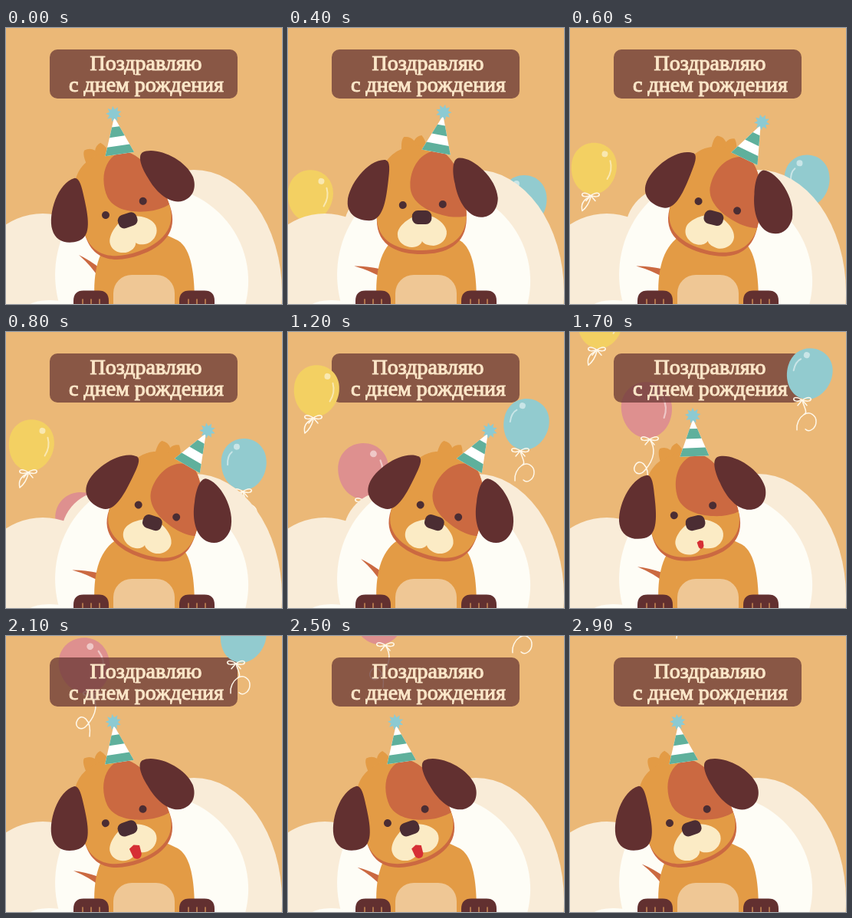
Recreate the animation shown at these times as an HTML page. Size 360x360 px, loop 3000 ms.

```html
<!DOCTYPE html>
<html lang="ru">
<head>
<meta charset="utf-8">
<title>Поздравляю с днем рождения</title>
<style>
  html, body { margin: 0; width: 100%; height: 100%; overflow: hidden; background: #ebb877; }
  svg { display: block; width: 100vw; height: 100vh; }
  text { font: 28px "Liberation Serif", "Times New Roman", serif; fill: #fbe6c8; stroke: #fbe6c8; stroke-width: 1.1; text-anchor: middle; }
  .line { fill: none; stroke: #fff8ea; stroke-width: 1.5; stroke-linecap: round; stroke-linejoin: round; }
  .shine { fill: none; stroke: #fff; stroke-opacity: .5; stroke-width: 2; stroke-linecap: round; }
  .dot { fill: #fff; fill-opacity: .5; }
  .cream { fill: #f9ecd8; }
  .white { fill: #fefdf6; }
  .fur { fill: #e39b45; }
  .rust { fill: #cb6941; }
  .ear { fill: #623030; }
  .dark { fill: #4b2d33; }
  .teal { fill: #5fb09c; }
  .claw { fill: none; stroke: #c98a55; stroke-width: 1.5; stroke-linecap: round; }
</style>
</head>
<body>
<svg viewBox="0 0 360 360">
  <defs>
    <path id="skull" d="M178 153C212 153 233 195 233 243C233 279 205 290 175 290C145 290 116 280 116 245C114 180 130 153 178 153Z"/>
    <clipPath id="face"><use href="#skull"/></clipPath>
    <path id="skin" d="M0 0C-18 0 -29.5 -18 -29.5 -36C-29.5 -55 -16 -67 0 -67C16 -67 29.5 -55 29.5 -36C29.5 -18 18 0 0 0Z"/>
    <path id="bow" class="line" d="M0 2C-14 -8 -16 8 0 2C14 -8 16 8 0 2L-6 9M0 2L6 9"/>
    <g id="shineRight">
      <circle class="dot" cx="12" cy="-54" r="4"/>
      <path class="shine" d="M20 -46Q25 -34 19 -22"/>
    </g>
    <g id="paw">
      <path class="ear" d="M-23 362V356Q-23 342.500 -10 342.500H10Q23 342.500 23 356V362Z"/>
      <path class="claw" d="M-11 354V361M0 354V361M11 354V361"/>
    </g>
  </defs>

  <rect width="360" height="360" fill="#ebb877"/>

  <g id="pink">
    <g class="body">
      <g transform="scale(1.12 1.09)"><use href="#skin" fill="#de908f"/><use href="#shineRight"/></g>
    </g>
    <path class="line" d="M0 2C8 14 6 28 -6 42C-14 52 -24 44 -19 36C-14 26 0 34 -3 57"/>
    <use href="#bow"/>
  </g>

  <rect x="57" y="28" width="245" height="64" rx="10" fill="#683735" fill-opacity=".75"/>
  <text x="182.500" y="55">Поздравляю</text>
  <text x="183" y="83">с днем рождения</text>

  <g id="yellow">
    <g class="body"><use href="#skin" fill="#f3d062"/><use href="#shineRight"/></g>
    <path class="line" d="M-2 4C-10 8 -13 14 -11 22C-6 18 -2 12 0 4"/>
    <use href="#bow"/>
  </g>
  <g id="blue">
    <g class="body">
      <use href="#skin" fill="#92cbcf"/>
      <circle class="dot" cx="-10" cy="-56" r="4"/>
      <path class="shine" d="M-21 -32Q-22 -44 -16 -49"/>
    </g>
    <path class="line" d="M0 2C2 12 8 18 2 21C-4 25 -8 33 -7 41M2 21C10 16 18 22 18 30C18 39 9 45 4 40"/>
    <use href="#bow"/>
  </g>

  <ellipse class="cream" cx="245" cy="345" rx="115" ry="160"/>
  <circle class="cream" cx="130" cy="265" r="58"/>
  <circle class="cream" cx="48" cy="330" r="88"/>
  <path class="white" d="M190 190V206A126 124 0 0 1 302 387L70 362A126 132 0 0 1 190 190Z"/>
  <ellipse class="white" cx="57" cy="364" rx="28" ry="9"/>

  <path id="tail" class="rust" d="M95 296Q108 302 125 315L121 326Q112 311 95 296Z"/>
  <path class="fur" d="M150 268C122 280 112 315 116 362H246C246 325 243 288 224 277L205 268Z"/>
  <rect x="140" y="322" width="80" height="60" rx="24" fill="#efc795"/>
  <use href="#paw" x="111"/>
  <use href="#paw" x="249"/>

  <g id="head">
    <use href="#skull" class="rust" y="5"/>
    <path class="fur" d="M149 164Q147 146 152 142Q160 141 165 147Q168 141 175 140Q181 147 183 162Z"/>
    <use href="#skull" class="fur"/>
    <path class="rust" clip-path="url(#face)" d="M192 160C168 164 158 190 160 210C163 231 188 242 210 246C225 248 240 246 240 240V160Z"/>
    <g transform="translate(203 114) rotate(11)">
      <path fill="#fff" d="M0 0L19 49H-19Z"/>
      <path class="teal" d="M-5 13H5L10 26H-10ZM-14.700 38H14.700L19 49H-19Z"/>
      <path id="star" fill="#8ccad2"/>
    </g>
    <path class="ear" d="M128 172C134 174 133 185 131 200C128 225 124 251 106 251C90 251 77 242 78 226C79 205 105 170 128 172Z"/>
    <path class="ear" d="M222 170C214 173 215 190 218 203C222 227 235 247 252 247C266 247 274 236 274 222C272 195 240 167 222 170Z"/>
    <circle class="dark" cx="150" cy="231" r="5"/>
    <circle class="dark" cx="202" cy="230" r="5"/>
    <path fill="#fbebc5" d="M175 243C165 243 143 256 143 269C143 280 153 286 162 286C169 286 174 282 175 278C177 282 184 284 190 284C200 283 208 275 207 265C205 253 188 243 175 243Z"/>
    <path id="tongue" fill="#d62f35" d="M-7 2L0 -1L7 2L6 13Q4 18 0 18Q-5 18 -6 13Z"/>
    <rect class="dark" x="162" y="238" width="25.500" height="18" rx="7.500"/>
  </g>
</svg>
<script>
  const $ = id => document.getElementById(id);
  const LOOP = 3000, STEP = 100;
  const linear = p => p;
  const sine = p => (1 - Math.cos(Math.PI * p)) / 2;

  // Value at time t on a track of [time, value] points
  function at(track, t, ease = linear) {
    if (t <= track[0][0]) return track[0][1];
    for (let i = 1; i < track.length; i++) {
      const [t0, a] = track[i - 1], [t1, b] = track[i];
      if (t <= t1) return a + (b - a) * ease((t - t0) / (t1 - t0));
    }
    return track[track.length - 1][1];
  }

  const headTurn = [[50, -19.4], [750, 19], [1200, 19], [1880, -19.6], [2900, -19.4]];
  const tailTurn = [[0, 0], [350, -26], [850, -26], [1200, 0], [1700, -19], [2100, -19], [2900, -3], [3000, 0]];
  const tongueOut = [[1450, 0], [1900, 1], [2450, 1], [2800, 0]];

  // Each balloon hangs on its knot: start height, rise speed, sideways drift, tilt
  const balloons = [
    { id: 'yellow', y: 323, v: .1775, x: [[400, 25], [1200, 33], [1700, 35]], tilt: [[0, 7]] },
    { id: 'blue', y: 312, v: .1325, x: [[400, 308], [800, 309], [1200, 303], [1700, 303], [2100, 300]],
      tilt: [[400, 0], [800, 2], [1200, 13], [1700, 16]] },
    { id: 'pink', y: 410, v: .16, x: [[800, 98], [1200, 99], [1700, 104], [2100, 112], [2900, 142]],
      tilt: [[1200, -1], [1700, -6], [2100, -15]] }
  ];

  const points = Array.from({ length: 18 }, (_, i) => {
    const a = i * Math.PI / 9, r = i % 2 ? 6 : 10.5;
    return `${(r * Math.sin(a)).toFixed(2)} ${(-4 - r * Math.cos(a)).toFixed(2)}`;
  });
  $('star').setAttribute('d', `M${points.join('L')}Z`);

  const move = (el, value) => el.setAttribute('transform', value);

  function draw(t) {
    move($('head'), `rotate(${at(headTurn, t, sine)} 178 296)`);
    move($('tail'), `rotate(${at(tailTurn, t, sine)} 122 322)`);
    move($('tongue'), `translate(175 271) scale(${at(tongueOut, t, sine)})`);
    for (const b of balloons) {
      const el = $(b.id);
      move(el, `translate(${at(b.x, t)} ${b.y - b.v * t})`);
      move(el.querySelector('.body'), `rotate(${at(b.tilt, t)})`);
    }
  }

  const start = performance.now();
  function tick() {
    const t = (performance.now() - start) % LOOP;
    draw(Math.floor(t / STEP) * STEP);
    requestAnimationFrame(tick);
  }
  tick();
</script>
</body>
</html>
```
